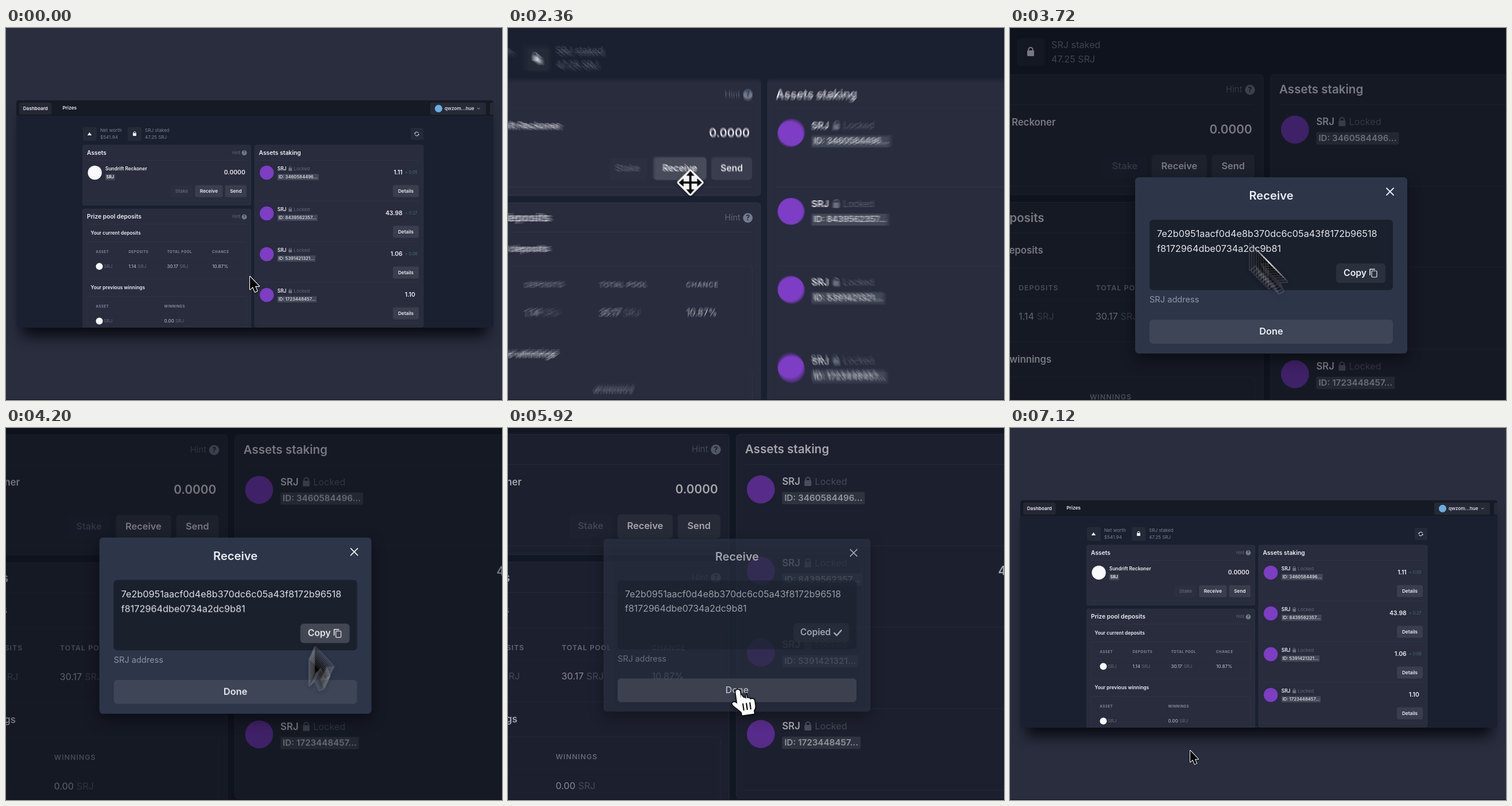
These frames come from a looping animation (864 by 648 pixels, 7.16 s). An HTML page with a canvas:

```html
<!DOCTYPE html>
<html lang="en">
<head>
<meta charset="utf-8">
<title>Staking dashboard</title>
<style>
  html, body { margin: 0; width: 100%; height: 100%; overflow: hidden; background: #292d3e; }
  canvas { display: block; width: 864px; height: 648px; }
</style>
</head>
<body>
<canvas id="stage" width="864" height="648"></canvas>
<script>
const W = 864, H = 648, LOOP = 7160, TICK = 40;
const SHUTTER = 50, SAMPLES = 9;
const screen2d = document.getElementById('stage').getContext('2d');
const layer = document.createElement('canvas');
layer.width = W;
layer.height = H;
const c = layer.getContext('2d');

const COIN = 'SRJ', COIN_NAME = 'Sundrift Reckoner', USER = 'qwzom...hue';
const ADDRESS = ['7e2b0951aacf0d4e8b370dc6c05a43f8172b96518', 'f8172964dbe0734a2dc9b81'];
const STAKES = [
  ['3460584496...', '1.11', '+ 0.05'],
  ['8439562357...', '43.98', '+ 0.27'],
  ['5391421321...', '1.06', '+ 0.06'],
  ['1723448457...', '1.10', '']
];
const WHITE = '#eceef3', DIM = '#646979', PANEL = '#282c3d', LINE = '#343949', BUTTON = '#393d4d';

// Motion
const clamp = v => Math.max(0, Math.min(1, v));
const smooth = u => u * u * (3 - 2 * u);
const spring = ms => ms <= 0 ? 0 : 1 - (1 + ms * 0.0194) * Math.exp(-ms * 0.0194);

function camera(t) {
  const zoom = spring(t - 2145) - spring(t - 6396);
  const toCopy = spring(t - 3860), toLeft = spring(t - 6080);
  return {
    s: 1 + zoom,
    x: zoom * (-412 - 56 * toCopy + 234 * toLeft),
    y: zoom * (-327 - 70 * toCopy - 18.5 * toLeft)
  };
}

const PATH = [
  [0, 425, 433], [1300, 425, 433], [2220, 363, 297], [2360, 363, 297], [2520, 353, 290],
  [3400, 353, 290], [4020, 487, 423], [4320, 508, 378.5], [5200, 508, 378.5],
  [5680, 434, 427], [6000, 434, 427], [6380, 311, 437], [6480, 311, 437],
  [7000, 314, 562], [LOOP, 314, 562]
];
const SHAPES = [[0, arrow], [2300, fleur], [2400, hand], [2640, arrow], [4240, hand], [6000, arrow]];
const PRESSES = [2560, 4600, 5900, 7140];

function pointer(t) {
  t = Math.max(0, Math.min(LOOP, t));
  const i = Math.max(1, PATH.findIndex(k => k[0] >= t));
  const [t0, x0, y0] = PATH[i - 1], [t1, x1, y1] = PATH[i];
  const u = smooth((t - t0) / (t1 - t0));
  return { x: x0 + (x1 - x0) * u, y: y0 + (y1 - y0) * u };
}

// Drawing helpers
function box(x0, y0, x1, y1, fill, r = 3, stroke) {
  c.beginPath();
  c.roundRect(x0, y0, x1 - x0, y1 - y0, r);
  if (fill) { c.fillStyle = fill; c.fill(); }
  if (stroke) { c.strokeStyle = stroke; c.lineWidth = 0.6; c.stroke(); }
}

function disc(x, y, r, fill) {
  c.beginPath();
  c.arc(x, y, r, 0, 7);
  c.fillStyle = fill;
  c.fill();
}

function text(s, x, y, size, color = WHITE, weight = 400, align = 'left', gap = 0) {
  c.font = `${weight} ${size}px Inter, sans-serif`;
  c.letterSpacing = gap + 'px';
  c.textAlign = align;
  c.textBaseline = 'middle';
  c.fillStyle = color;
  c.fillText(s, x, y);
  return c.measureText(s).width;
}

function lines(color, width, ...paths) {
  c.strokeStyle = color;
  c.lineWidth = width;
  c.lineCap = c.lineJoin = 'round';
  c.beginPath();
  for (const p of paths) p.forEach(([x, y], i) => i ? c.lineTo(x, y) : c.moveTo(x, y));
  c.stroke();
}

function poly(points, fill) {
  c.beginPath();
  points.forEach(([x, y]) => c.lineTo(x, y));
  c.closePath();
  c.fillStyle = fill;
  c.fill();
}

const rule = (x0, x1, y, color = LINE) => { c.fillStyle = color; c.fillRect(x0, y - 0.3, x1 - x0, 0.6); };

function shadow(color, blur, dy) {
  c.shadowColor = color;
  c.shadowBlur = blur;
  c.shadowOffsetY = dy;
}
const noShadow = () => shadow('transparent', 0, 0);

function button(label, x0, y0, x1, y1, fill = BUTTON, color = WHITE) {
  box(x0, y0, x1, y1, fill);
  text(label, (x0 + x1) / 2, (y0 + y1) / 2, 8.2, color, 600, 'center');
}

function lock(x, y, color) {
  box(x - 3, y - 1, x + 3, y + 4, color, 0.8);
  c.beginPath();
  c.arc(x, y - 1.6, 1.9, Math.PI, 0);
  c.lineTo(x + 1.9, y - 0.5);
  c.moveTo(x - 1.9, y - 1.6);
  c.lineTo(x - 1.9, y - 0.5);
  c.strokeStyle = color;
  c.lineWidth = 1;
  c.stroke();
}

function hint(y) {
  text('Hint', 394, y, 7.5, DIM);
  disc(415, y, 4.4, '#737b8f');
  text('?', 415, y + 0.2, 6.6, PANEL, 700, 'center');
}

function amount(n, x, y) {
  const w = text(n, x, y, 8.1, '#c3c6cf');
  text(COIN, x + w + 2.4, y, 8.1, DIM);
}

const heading = (s, x, y) => text(s, x, y, 6.2, '#8f94a2', 600, 'left', 0.5);
const title = (s, x, y) => text(s, x, y, 10.3, WHITE, 600);

// Page parts
function navbar() {
  c.fillStyle = '#161a25';
  c.fillRect(18, 126, 832, 27);
  button('Dashboard', 23, 130, 79.5, 150.5, '#242835');
  text('Prizes', 98.5, 140, 8.2, WHITE, 600);
  box(739, 130, 836, 151, '#262a37');
  disc(753.5, 140.3, 6.5, '#68aee0');
  text(USER, 764, 140.3, 8.2, '#d8dae0', 600);
  lines('#b8bbc5', 0.9, [[821.3, 139.4], [823.3, 141.3], [825.3, 139.4]]);
  box(843, 130, 852, 151, '#262a37');
}

function stats() {
  const fill = '#252a39', grey = '#7b8090';
  box(134, 172.5, 158, 196.5, fill);
  poly([[141.7, 187], [149.3, 187], [145.5, 181.8]], WHITE);
  text('Net worth', 164, 178.5, 8.1, grey);
  text('$541.94', 164, 191, 8.1, grey);
  box(212, 172.5, 236, 196.5, fill);
  lock(224, 184, WHITE);
  text(COIN + ' staked', 242, 178.5, 8.1, grey);
  text('47.25 ' + COIN, 242, 191, 8.1, grey);
  box(705, 174, 727, 195, fill);
  c.strokeStyle = WHITE;
  c.lineWidth = 1;
  for (const a of [0.3, 0.3 + Math.PI]) {
    c.beginPath();
    c.arc(715.5, 184.5, 3.3, a, a + 2.3);
    c.stroke();
    disc(715.5 + 3.3 * Math.cos(a), 184.5 + 3.3 * Math.sin(a), 1, WHITE);
  }
}

function assets(t) {
  box(133.7, 204, 426.5, 308.7, PANEL, 3, LINE);
  title('Assets', 141, 217.5);
  hint(217.3);
  rule(141, 419, 230.3);
  disc(154.7, 252, 12.2, '#fafafc');
  text(COIN_NAME, 173, 245.8, 8.4, WHITE, 600);
  box(173, 254.5, 190, 265.2, '#414656', 1);
  text(COIN, 181.5, 260, 7, WHITE, 700, 'center');
  text('0.0000', 416.8, 252.3, 10.4, WHITE, 600, 'right');
  button('Stake', 287, 273.7, 325, 294.7, '#2b2f40', '#5e6373');
  button('Receive', 329.3, 273.7, 377.5, 294.7, t > 2240 && t < 2700 ? '#474b5a' : BUTTON);
  button('Send', 381.7, 273.7, 419, 294.7);
  rule(141, 419, 301);
}

function deposits() {
  box(133.7, 315.3, 426.5, 540, PANEL, 3, LINE);
  title('Prize pool deposits', 141, 329.3);
  hint(329);
  rule(141, 419, 341.8);
  text('Your current deposits', 147.5, 357.3, 8.4, WHITE, 600);
  box(141.2, 372.5, 419, 437, null, 3, LINE);
  [['ASSET', 156.5], ['DEPOSITS', 213.5], ['TOTAL POOL', 280.7], ['CHANCE', 359]]
    .forEach(([s, x]) => heading(s, x, 390));
  rule(149, 411, 400.8, '#2d3243');
  disc(162.6, 415.3, 6, '#fafafc');
  text(COIN, 170.3, 415.3, 8.1, DIM);
  amount('1.14', 213.5, 415.3);
  amount('30.17', 280.5, 415.3);
  text('10.87%', 359.2, 415.3, 8.1, '#c3c6cf');
  text('Your previous winnings', 147.5, 452.5, 8.4, WHITE, 600);
  box(141.2, 467.5, 419, 540, null, 3, LINE);
  heading('ASSET', 156.5, 485.2);
  heading('WINNINGS', 275.5, 485.2);
  rule(149, 411, 495.8, '#2d3243');
  disc(162.6, 510.5, 6, '#fafafc');
  text(COIN, 170.3, 510.5, 8.1, DIM);
  amount('0.00', 275.5, 510.5);
}

function staking() {
  box(433, 204, 727, 521, PANEL, 3, LINE);
  title('Assets staking', 440.5, 217.5);
  rule(440.5, 719, 230.3);
  STAKES.forEach(([id, sum, gain], i) => {
    const y = 252 + 71 * i;
    disc(454.2, y, 12.2, '#7d3dc4');
    text(COIN, 472.7, y - 6.3, 8.4, WHITE, 600);
    lock(495.2, y - 7, '#6a7082');
    text('Locked', 501.3, y - 6.3, 8.1, DIM);
    c.font = '600 7.6px Inter, sans-serif';
    c.letterSpacing = '0px';
    const label = 'ID: ' + id;
    box(472.7, y + 2.2, 476.7 + c.measureText(label).width, y + 13, '#434857', 1);
    text(label, 474.7, y + 7.6, 7.6, '#d4d6dd', 600);
    text(sum, gain ? 690.7 : 712.8, y + 0.3, 10.4, WHITE, 600, 'right');
    text(gain, 695, y + 0.3, 7.2, '#467168');
    button('Details', 674, y + 21.6, 719, y + 42.6);
    rule(440.5, 719, y + 49);
  });
}

function modal(t, s) {
  const v = clamp((t - 2560) / 200) * (1 - clamp((t - 5875) / 120));
  if (!v) return;
  c.fillStyle = `rgba(2,6,12,${0.5 * v})`;
  c.fillRect(18, 126, 832, 396);
  c.save();
  c.globalAlpha = v;
  const k = 0.95 + 0.05 * v;
  c.translate(433.5, 370.3);
  c.scale(k, k);
  c.translate(-433.5, -370.3);
  shadow('rgba(0,0,0,.45)', 12 * s, 5 * s);
  box(315, 293.5, 552, 447, '#2d3549');
  noShadow();
  text('Receive', 433.5, 310, 10.1, WHITE, 600, 'center');
  lines(WHITE, 0.9, [[534, 303], [540, 309]], [[540, 303], [534, 309]]);
  box(327.5, 330.5, 539.5, 391.7, '#1b202d');
  ADDRESS.forEach((s, i) => text(s, 334, 343.3 + 12.7 * i, 8.15, '#e3e5ea'));
  const copied = t >= 4640;
  const over = t >= 4200 && t < 5360;
  box(copied ? 483.5 : 490, 368.5, 533, 385.5, over ? '#434753' : '#2b303d');
  text(copied ? 'Copied' : 'Copy', copied ? 489.5 : 496.5, 377, 7.9, WHITE, 600);
  if (copied) {
    lines(WHITE, 1.3, [[519.8, 377.2], [522, 379.3], [526, 374.8]]);
  } else {
    box(521, 375, 525.5, 380.5, null, 0.7, WHITE);
    lines(WHITE, 0.8, [[519.5, 378.6], [519.5, 373.6], [523.6, 373.6]]);
  }
  text(COIN + ' address', 327.5, 400.5, 7.3, '#9197a5');
  button('Done', 327.5, 417.5, 539.5, 438.5, t >= 5580 ? '#4a4f5d' : '#3d4556');
  c.restore();
}

// Pointer shapes, hot spot at 0,0
function arrow() {
  c.beginPath();
  [[0, 0], [0, 22.5], [5, 18], [8.7, 26.8], [12.6, 25.1], [9, 16.8], [16, 16.8]].forEach(([x, y]) => c.lineTo(x, y));
  c.closePath();
  c.lineJoin = 'round';
  c.strokeStyle = '#fff';
  c.lineWidth = 2.2;
  c.stroke();
  noShadow();
  c.fillStyle = '#050507';
  c.fill();
}

function hand() {
  c.rotate(-0.14);
  const p = new Path2D('M-2.2 1.5C-2.2-1.2 2.2-1.2 2.2 1.5V9C3-.0 3 8 5.5 8.2Q7 8.4 7.2 9.6Q8-.0 8 9Q10.6 8.6 11 10.6Q15 9.6 15 13V17Q15 20 13 22V25H1V22L-6.6 14Q-8 11-5 11Q-3.6 11.2-2.2 13Z');
  c.lineJoin = 'round';
  c.strokeStyle = '#08080b';
  c.lineWidth = 1.8;
  c.stroke(p);
  noShadow();
  c.fillStyle = '#fff';
  c.fill(p);
  lines('#08080b', 1.2, [[3.3, 14], [3.3, 20]], [[6.8, 14], [6.8, 20]], [[10.3, 14], [10.3, 20]]);
}

function fleur() {
  c.rotate(Math.PI / 4);
  box(-9, -9, 9, 9, '#f4f4f4', 2);
  noShadow();
  c.rotate(-Math.PI / 4);
  for (let i = 0; i < 4; i++) {
    lines('#08080b', 2, [[0, 0], [0, -7]]);
    poly([[0, -10.5], [-3.7, -6.2], [3.7, -6.2]], '#08080b');
    c.rotate(Math.PI / 2);
  }
}

function drawPointer(t, at, cam) {
  const near = Math.min(...PRESSES.map(p => Math.abs(t - p)));
  const k = cam.s * (1 - 0.14 * clamp(1 - near / 130));
  c.setTransform(k, 0, 0, k, cam.x + at.x * cam.s, cam.y + at.y * cam.s);
  shadow('rgba(0,0,0,.4)', 3 * k, k);
  SHAPES.filter(([from]) => t >= from).pop()[1]();
  noShadow();
}

function drawScene(t, cam) {
  c.setTransform(1, 0, 0, 1, 0, 0);
  c.fillStyle = '#292d3e';
  c.fillRect(0, 0, W, H);
  c.setTransform(cam.s, 0, 0, cam.s, cam.x, cam.y);
  shadow('rgba(4,6,11,.9)', 24 * cam.s, 18 * cam.s);
  box(28, 136, 838, 518, '#1a2030');
  noShadow();
  c.save();
  c.beginPath();
  c.roundRect(18, 126, 831, 396, 4);
  c.clip();
  c.fillStyle = '#1a2030';
  c.fillRect(18, 126, 832, 396);
  navbar();
  stats();
  assets(t);
  deposits();
  staking();
  modal(t, cam.s);
  c.restore();
}

function render(t) {
  const a = t - SHUTTER / 2, b = t + SHUTTER / 2;
  const [ca, cb, pa, pb] = [camera(a), camera(b), pointer(a), pointer(b)];
  const shift = Math.abs(ca.s - cb.s) * 400 + Math.hypot(ca.x - cb.x, ca.y - cb.y) +
    Math.hypot(pa.x - pb.x, pa.y - pb.y) * ca.s;
  const n = shift > 0.8 ? SAMPLES : 1;
  const still = camera(t);
  for (let i = 0; i < n; i++) {
    const at = n > 1 ? a + SHUTTER * i / (n - 1) : t;
    drawScene(t, camera(at));
    drawPointer(t, pointer(at), still);
    screen2d.globalAlpha = 1 / (i + 1);
    screen2d.drawImage(layer, 0, 0);
  }
  screen2d.globalAlpha = 1;
  screen2d.fillStyle = '#17131f';
  screen2d.fillRect(0, H - 1, W, 1);
}

const start = performance.now();
let shown = -1;
function frame() {
  const ms = Math.max(0, performance.now() - start) % LOOP;
  const t = Math.floor(ms / TICK) * TICK;
  if (t !== shown) render(shown = t);
  requestAnimationFrame(frame);
}
frame();
</script>
</body>
</html>
```
